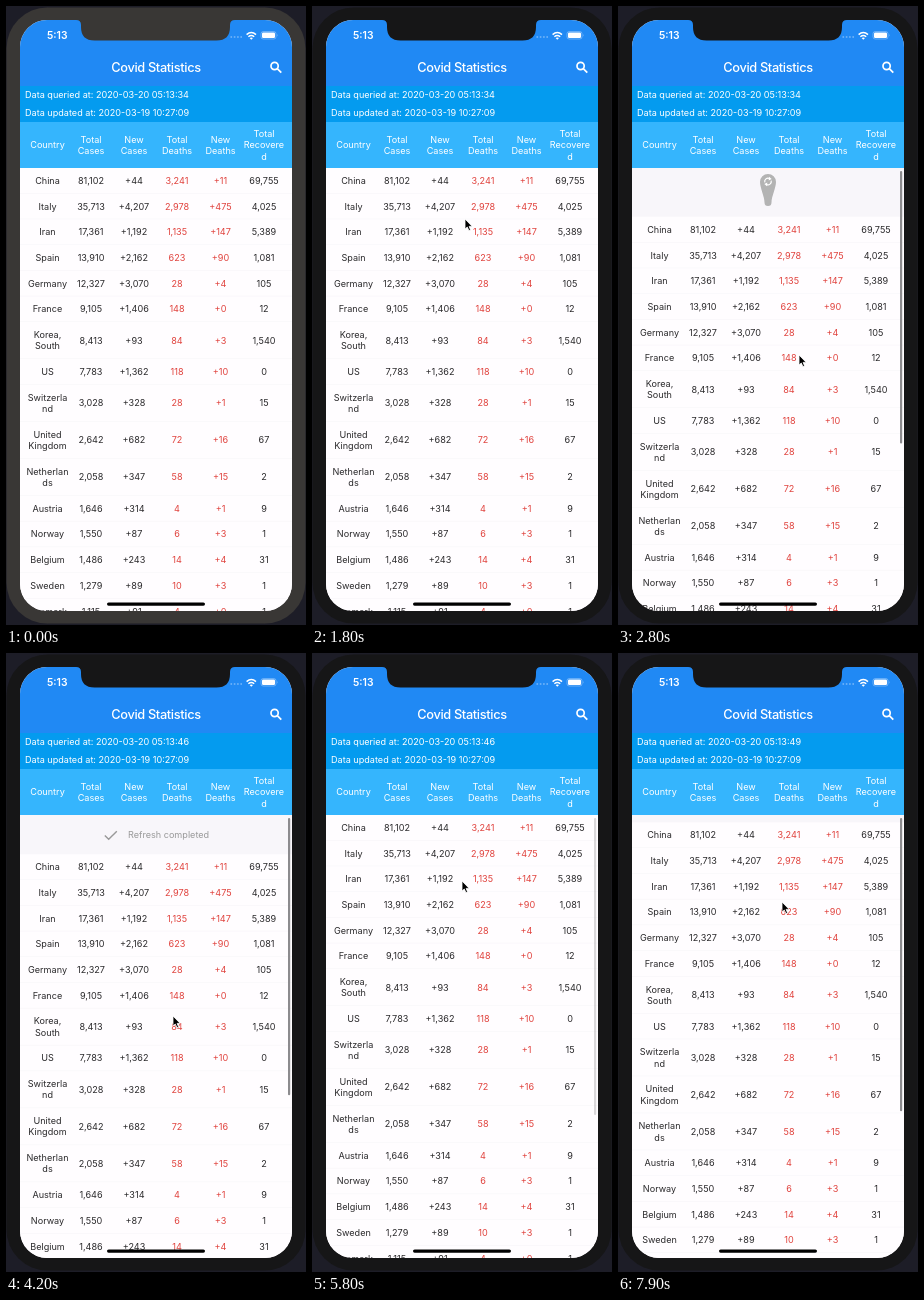
Recreate the animation shown at these times as an HTML page. Size 300x619 px, loop 8000 ms.

```html
<!DOCTYPE html>
<html lang="en">
<head>
<meta charset="utf-8">
<title>Covid Statistics</title>
<style>
  html, body { margin: 0; width: 100%; height: 100%; overflow: hidden; background: #1d1d27; }
  svg { display: block; width: 100vw; height: 100vh; }
  text { font: 9.1px Inter, Roboto, sans-serif; }
</style>
</head>
<body>
<svg id="stage" viewBox="0 0 300 619">
  <defs>
    <clipPath id="screen"><rect x="14" y="14" width="272" height="591" rx="27"/></clipPath>
    <clipPath id="listArea"><rect x="14" y="162" width="272" height="443"/></clipPath>
  </defs>
  <rect id="body" x="0.5" y="1.5" width="299" height="616" rx="41"/>
  <g clip-path="url(#screen)">
    <rect x="14" y="14" width="272" height="591" fill="#f8f6fa"/>
    <g clip-path="url(#listArea)">
      <g id="header">
        <g id="drop">
          <path id="dropShape" fill="#b3b3b3"/>
          <g fill="none" stroke="#fff" stroke-width="1.2">
            <path d="M146.8 176.3A3.3 3.3 0 0 1 151.6 172.6M153.2 174.7A3.3 3.3 0 0 1 148.4 178.4"/>
          </g>
          <path d="M151 170.8L153.7 173L150.7 174.5ZM149 180.2L146.3 178L149.3 176.5Z" fill="#fff"/>
        </g>
        <g id="spinner"></g>
        <g id="done">
          <path d="M98.8 182.4L102.7 186.3L110.8 178.2" fill="none" stroke="#999" stroke-width="1.4"/>
          <text x="122" y="185.3" fill="#999">Refresh completed</text>
        </g>
      </g>
      <g id="list"></g>
      <rect id="scrollbar" x="282" y="165" width="2.2" rx="1.1" fill="#8c8b8e"/>
    </g>
    <rect x="14" y="14" width="272" height="66" fill="#2089f4"/>
    <rect x="14" y="80" width="272" height="36" fill="#049bef"/>
    <rect x="14" y="116" width="272" height="46" fill="#35b5fd"/>
    <g id="labels" fill="#fff">
      <text x="150" y="66" text-anchor="middle" style="font-size:12.8px;font-weight:500;letter-spacing:-.35px">Covid Statistics</text>
      <text x="41" y="33" style="font-size:10.3px;font-weight:600">5:13</text>
      <text id="queried" x="19" y="92.3"></text>
      <text x="19" y="110.3">Data updated at: 2020-03-19 10:27:09</text>
    </g>
    <g fill="none" stroke="#fff" stroke-width="1.7">
      <circle cx="268.6" cy="60" r="3.6"/>
      <path d="M271.3 62.7L275.3 66.7"/>
      <path d="M240.6 28.6Q245.3 24.3 250 28.6M242.4 30.7Q245.3 28.2 248.2 30.7" stroke-width="1.5"/>
    </g>
    <path d="M243.6 32Q245.3 30.8 247 32L245.3 33.8Z" fill="#fff"/>
    <path d="M224.5 31H236" stroke="#fff" stroke-opacity=".4" stroke-width="1.6" stroke-dasharray="1.6 1.7"/>
    <rect x="255" y="25.5" width="15" height="7.5" rx="2.2" fill="none" stroke="#fff" stroke-opacity=".45" stroke-width=".7"/>
    <rect x="256" y="26.5" width="13" height="5.5" rx="1.3" fill="#fff"/>
    <path d="M271 28V30.5Q272 29.3 271 28Z" fill="#fff" opacity=".5"/>
    <rect x="101" y="596.4" width="98" height="3.3" rx="1.6" fill="#000"/>
  </g>
  <path id="notch" d="M70 13V14Q75 14 75 19V21Q75 34.5 88.5 34.5H210.5Q224 34.5 224 21V19Q224 14 229 14V13Z"/>
  <path id="cursor" d="M0 0V10L2.3 8L3.9 11.6L5.6 10.9L4.1 7.4H7.2Z" fill="#000" stroke="#fff" stroke-width=".8"/>
</svg>
<script>
const LOOP = 8000, STEP = 100, TOP = 162, HEADER = 39.4;
const COLUMNS = [41.5, 85, 128, 171, 214.5, 258];
const HEADINGS = 'Country|Total/Cases|New/Cases|Total/Deaths|New/Deaths|Total/Recovere/d';
const ROWS = [
  'China|81,102|+44|3,241|+11|69,755',
  'Italy|35,713|+4,207|2,978|+475|4,025',
  'Iran|17,361|+1,192|1,135|+147|5,389',
  'Spain|13,910|+2,162|623|+90|1,081',
  'Germany|12,327|+3,070|28|+4|105',
  'France|9,105|+1,406|148|+0|12',
  'Korea,/South|8,413|+93|84|+3|1,540',
  'US|7,783|+1,362|118|+10|0',
  'Switzerla/nd|3,028|+328|28|+1|15',
  'United/Kingdom|2,642|+682|72|+16|67',
  'Netherlan/ds|2,058|+347|58|+15|2',
  'Austria|1,646|+314|4|+1|9',
  'Norway|1,550|+87|6|+3|1',
  'Belgium|1,486|+243|14|+4|31',
  'Sweden|1,279|+89|10|+3|1',
  'Denmark|1,115|+91|4|+0|1'
];

// Keyframes: [time, value...]
const PULL = [
  [2000, 0], [2800, 49], [2900, 54], [3100, 54], [3400, HEADER], [4400, HEADER],
  [4500, 20], [4600, 7.5], [4700, 2], [4800, 0],
  [5800, 0], [6400, 41], [6600, 53], [6700, 53], [6900, HEADER], [7700, HEADER],
  [7800, 20], [7900, 7.5]
];
const POINTER = [
  [1100, 290, 285], [1600, 153, 213], [2000, 153, 213], [2800, 181, 349], [3000, 183, 362],
  [3400, 180, 364], [4200, 167, 363], [4800, 163, 383], [5600, 150, 228], [5800, 150, 228],
  [6400, 154, 325], [6600, 157, 358], [6900, 159, 360], [7900, 164, 249]
];
const BAR_ALPHA = [[1900, 0], [2050, 1], [4900, 1], [5200, 0], [5750, 0], [5900, 1]];

const $ = id => document.getElementById(id);

function add(parent, tag, attrs, text) {
  const el = document.createElementNS('http://www.w3.org/2000/svg', tag);
  for (const key in attrs) el.setAttribute(key, attrs[key]);
  if (text) el.textContent = text;
  return parent.appendChild(el);
}

function cell(parent, lines, x, y, fill) {
  lines.forEach((line, i) => add(parent, 'text', {
    x, y: y + 3.2 + (i - (lines.length - 1) / 2) * 11.3, fill, 'text-anchor': 'middle'
  }, line));
}

function track(keys, t) {
  const i = keys.findIndex(key => key[0] > t);
  if (i === 0) return keys[0].slice(1);
  if (i < 0) return keys[keys.length - 1].slice(1);
  const a = keys[i - 1], b = keys[i], k = (t - a[0]) / (b[0] - a[0]);
  return a.slice(1).map((v, n) => v + (b[n + 1] - v) * k);
}

function build() {
  HEADINGS.split('|').forEach((h, i) => cell($('labels'), h.split('/'), COLUMNS[i], 139, '#fff'));
  let y = TOP - 0.2;
  for (const row of ROWS) {
    const cells = row.split('|').map(c => c.split('/'));
    const height = cells[0].length > 1 ? 37 : 25.7;
    add($('list'), 'rect', { x: 14, y, width: 272, height: height + 0.3, fill: '#fffdff' });
    add($('list'), 'path', { d: `M14 ${y + height}H286`, stroke: '#f3f1f5', 'stroke-width': 0.7 });
    cells.forEach((c, i) =>
      cell($('list'), c, COLUMNS[i], y + height / 2, i === 3 || i === 4 ? '#e0433e' : '#2b2a2c'));
    y += height;
  }
  for (let i = 0; i < 12; i++) {
    add($('spinner'), 'path', {
      d: 'M0 -3.4V-6.2', stroke: '#8a8a8a', 'stroke-width': 1.3, 'stroke-linecap': 'round',
      transform: `translate(150 182) rotate(${i * 30})`
    });
  }
}

function drawDrop(pull) {
  const stretch = Math.max(0, pull - 29);
  const end = 187.5 + stretch * 0.62, r = 7.5 - stretch * 0.2, y = end - r;
  $('dropShape').setAttribute('d',
    `M142 176A8 8 0 0 1 158 176C158 182 ${150 + r} ${y - 6} ${150 + r} ${y}` +
    `A${r} ${r} 0 0 1 ${150 - r} ${y}C${150 - r} ${y - 6} 142 182 142 176Z`);
  $('drop').setAttribute('opacity', Math.min(1, Math.max(0.3, 0.75 + (pull - 41) * 0.032)));
}

function show(id, visible) {
  $(id).setAttribute('visibility', visible ? 'visible' : 'hidden');
}

function draw(t) {
  const [pull] = track(PULL, t);
  const [x, y] = track(POINTER, t);
  const within = (a, b) => t >= a && t < b;

  $('list').setAttribute('transform', `translate(0 ${pull})`);
  $('header').setAttribute('transform', `translate(0 ${Math.min(0, pull - HEADER)})`);
  show('drop', within(2000, 2900) || within(5800, 6500));
  show('spinner', within(2900, 3800) || within(6500, 7100));
  show('done', within(3800, 4800) || t >= 7100);
  drawDrop(pull);
  [...$('spinner').children].forEach((tick, i) =>
    tick.setAttribute('opacity', 0.25 + 0.75 * ((i - Math.floor(t / 83) % 12 + 11 + 12) % 12) / 11));

  $('scrollbar').setAttribute('height', 297 - pull / 2);
  $('scrollbar').setAttribute('opacity', track(BAR_ALPHA, t)[0]);
  const seconds = t < 3800 ? 34 : t < 7100 ? 46 : 49;
  $('queried').textContent = `Data queried at: 2020-03-20 05:13:${seconds}`;

  const bezel = t < 1400 ? '#393735' : '#161617';
  $('body').setAttribute('fill', bezel);
  $('notch').setAttribute('fill', bezel);
  $('cursor').setAttribute('transform', `translate(${x} ${y})`);
  show('cursor', t >= 1100);
}

const start = performance.now();
function tick() {
  const t = (performance.now() - start) % LOOP;
  draw(Math.floor(t / STEP) * STEP);
  requestAnimationFrame(tick);
}
build();
tick();
</script>
</body>
</html>
```
